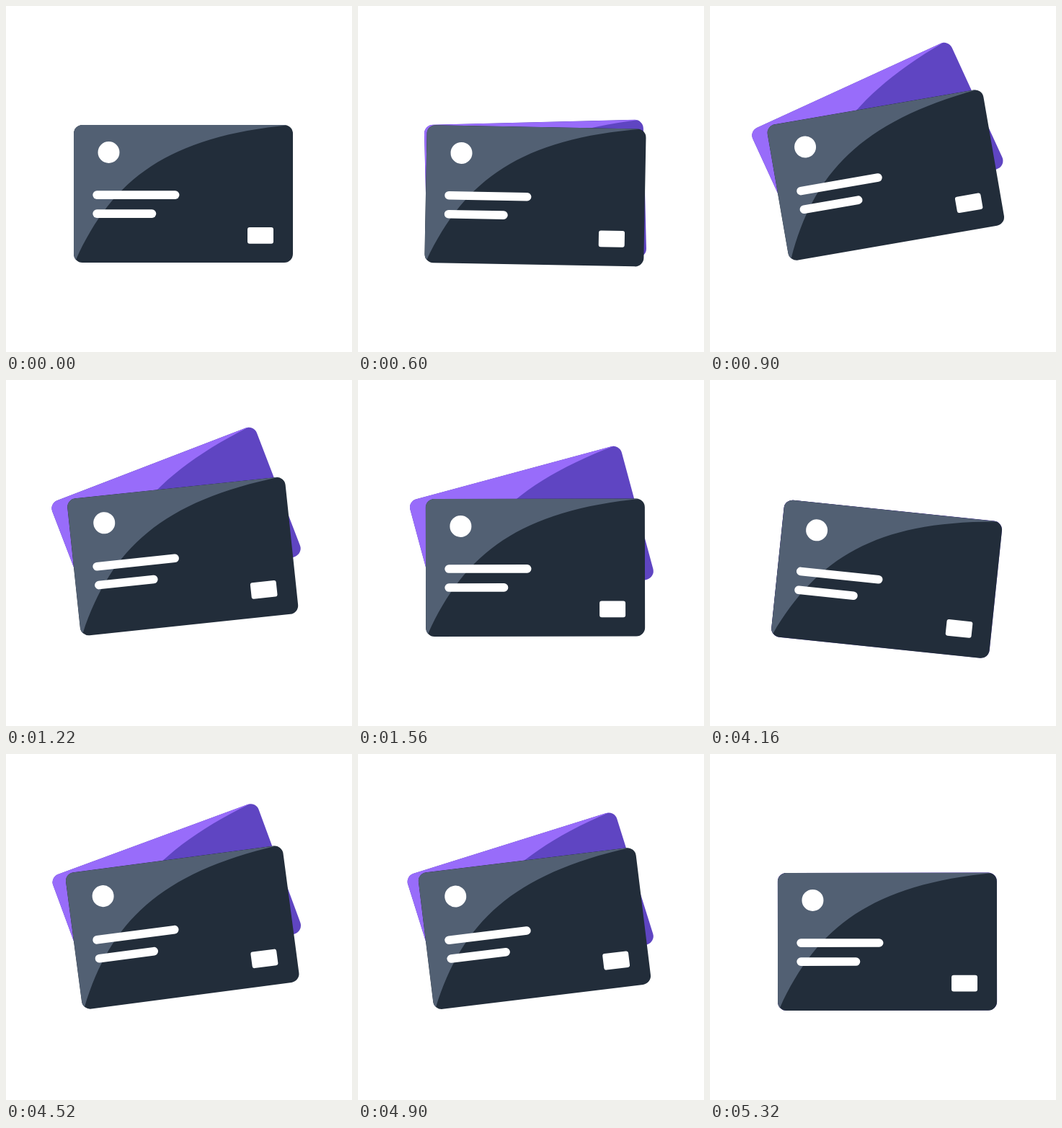
An HTML page for the animation above (7.46 s loop, 480 by 480 pixels).

```html
<!DOCTYPE html>
<html lang="en">
<head>
<meta charset="utf-8">
<title>Two cards</title>
<style>
  html, body { margin: 0; width: 100%; height: 100%; overflow: hidden; background: #fff; }
  svg { display: block; width: 100vw; height: 100vh; }
</style>
</head>
<body>
<svg viewBox="0 0 480 480">
  <defs>
    <rect id="card" x="94" y="165" width="304" height="191" rx="12"/>
    <clipPath id="edge"><use href="#card"/></clipPath>
    <path id="shine" clip-path="url(#edge)" d="M94 165H394C225 181 148 240 97 352L94 358Z"/>
  </defs>
  <g id="back">
    <use href="#card" fill="#5f45c2"/>
    <use href="#shine" fill="#986cfa"/>
  </g>
  <g id="front">
    <use href="#card" fill="#222d3a"/>
    <use href="#shine" fill="#526073"/>
    <g fill="#fff">
      <circle cx="142.5" cy="203" r="15"/>
      <rect x="120.3" y="256.3" width="120.2" height="11.6" rx="5.8"/>
      <rect x="120.3" y="282.3" width="88" height="11.6" rx="5.8"/>
      <rect x="335" y="307" width="36" height="22.7" rx="3"/>
    </g>
  </g>
</svg>
<script>
  const LOOP = 7460;
  // Each key: time in ms, front angle, back angle
  const keys = [
    [10, 0, 0], [433, 5, 7], [933, -10, -25], [1600, 0, -15],
    [3725, 0, -15], [4145, 6, 6], [4645, -10, -25], [5345, 0, 0], [LOOP, 0, 0]
  ];
  const front = document.getElementById('front');
  const back = document.getElementById('back');
  const smooth = u => u * u * (3 - 2 * u);

  function anglesAt(time) {
    if (time <= keys[0][0]) return [0, 0];
    const i = keys.findIndex(key => key[0] > time);
    const [from, to] = [keys[i - 1], keys[i]];
    const u = smooth((time - from[0]) / (to[0] - from[0]));
    return [1, 2].map(k => from[k] + (to[k] - from[k]) * u);
  }

  // Both cards swing about the middle of their left edge
  const turn = (card, angle) => card.setAttribute('transform', `rotate(${angle} 94 260)`);

  const start = performance.now();
  function draw() {
    const [frontAngle, backAngle] = anglesAt((performance.now() - start) % LOOP);
    turn(front, frontAngle);
    turn(back, backAngle);
    back.style.display = Math.abs(frontAngle - backAngle) < 0.03 ? 'none' : '';
    requestAnimationFrame(draw);
  }
  draw();
</script>
</body>
</html>
```
